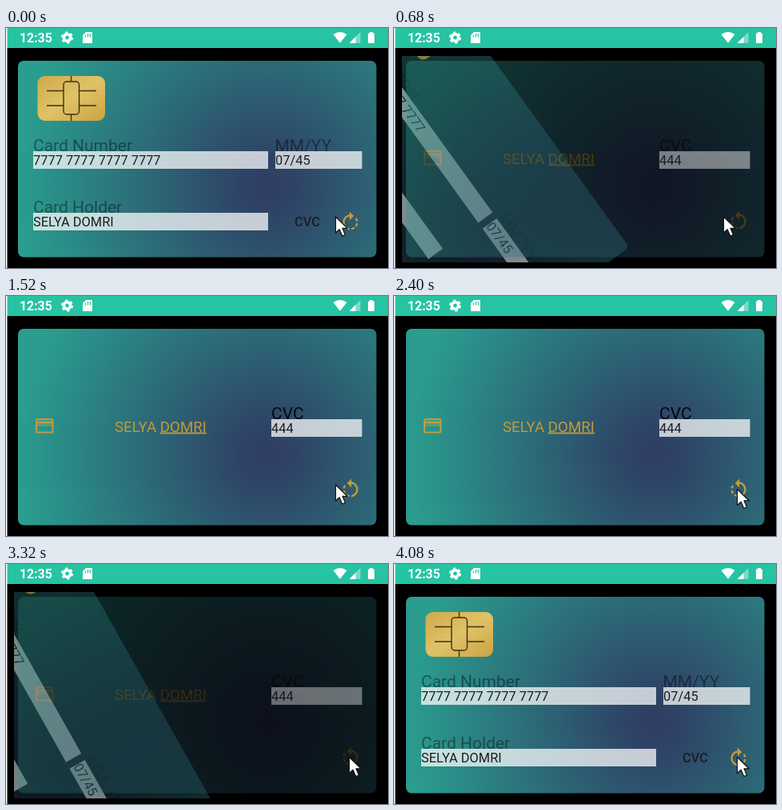
These frames come from a looping animation (478x300 px, 4120 ms). An HTML page:

```html
<!DOCTYPE html>
<html lang="en">
<head>
<meta charset="utf-8">
<title>Card flip</title>
<style>
  html, body { margin: 0; width: 100%; height: 100%; overflow: hidden; background: #000; }
  svg { display: block; width: 478px; height: 300px; font-family: Roboto, sans-serif; }
  .label { font-size: 21px; fill: #000; fill-opacity: .42; }
  .field { fill: #fff; fill-opacity: .73; }
  .value { font-size: 16.4px; fill: #1c1e22; }
  .gold { fill: #c39a3c; }
</style>
</head>
<body>
<svg viewBox="0 0 478 300">
  <defs>
    <radialGradient id="teal" gradientUnits="userSpaceOnUse" cx="327" cy="198" r="312">
      <stop offset="0" stop-color="#2f3d62"/>
      <stop offset=".12" stop-color="#2e4466"/>
      <stop offset="1" stop-color="#2a9d8f"/>
    </radialGradient>
    <linearGradient id="brass" x1="0" y1="0" x2="1" y2="1">
      <stop offset="0" stop-color="#d0a94a"/>
      <stop offset=".5" stop-color="#e0c266"/>
      <stop offset="1" stop-color="#c8a443"/>
    </linearGradient>
    <clipPath id="pane"><rect x="10" y="35" width="454" height="258"/></clipPath>
    <rect id="plate" x="15" y="41" width="448.500" height="245.500" rx="7" fill="url(#teal)"/>
    <path id="turn" class="gold" d="M15.550 5.550L11 1v3.070C7.060 4.560 4 7.920 4 12s3.050 7.440 7 7.930v-2.020c-2.840-.48-5-2.940-5-5.910s2.160-5.430 5-5.910V10zM19.930 11c-.17-1.390-.72-2.730-1.620-3.890l-1.420 1.420c.54.75.88 1.600 1.020 2.470zM13 17.900v2.020c1.390-.17 2.740-.71 3.900-1.610l-1.440-1.440c-.75.54-1.590.89-2.460 1.030zm3.890-2.420l1.420 1.410c.9-1.160 1.450-2.500 1.620-3.890h-2.020c-.14.87-.48 1.720-1.020 2.480z"/>
  </defs>

  <rect width="478" height="300"/>

  <g clip-path="url(#pane)">
    <g id="front">
      <use id="frontPlate" href="#plate"/>
      <g id="frontItems">
        <rect x="39.500" y="60" width="84.500" height="56" rx="9" fill="url(#brass)"/>
        <g fill="none" stroke="#3c3216" stroke-width="1.400">
          <rect x="72" y="67" width="19.500" height="41" rx="4"/>
          <path d="M51 78.500H72M51 97H72M91.500 78.500H113M91.500 97H113M81.500 60V67M81.500 108V116"/>
        </g>
        <text class="label" x="34" y="153.500">Card Number</text>
        <text class="label" x="336.500" y="153.500">MM/YY</text>
        <text class="label" x="34" y="231">Card Holder</text>
        <rect class="field" x="34" y="154" width="294" height="22"/>
        <rect class="field" x="337" y="154" width="108.500" height="22"/>
        <rect class="field" x="34" y="231" width="294" height="22"/>
        <text class="value" x="34" y="171">7777 7777 7777 7777</text>
        <text class="value" x="337" y="171">07/45</text>
        <text class="value" x="34" y="248">SELYA DOMRI</text>
        <text class="value" x="361" y="248" font-weight="500">CVC</text>
        <use href="#turn" transform="translate(416.600 228.400) scale(1.200)"/>
      </g>
    </g>

    <g id="backPlate">
      <use href="#plate"/>
      <g fill="none" stroke="#c39a3c" stroke-width="2">
        <rect x="38" y="154" width="20.500" height="16.500" rx="1.500"/>
        <path d="M38 158H58.500" stroke-width="3"/>
        <path d="M39 161.500H58" stroke-dasharray="1.500 1"/>
      </g>
      <text class="gold" x="136" y="169.500" font-size="18.700">SELYA <tspan text-decoration="underline">DOMRI</tspan></text>
      <use href="#turn" transform="translate(445.400 227.400) scale(-1.200 1.200)"/>
    </g>
    <g id="backItems">
      <text class="label" x="332" y="154" style="fill-opacity:.9">CVC</text>
      <rect class="field" x="332" y="154" width="113.500" height="22"/>
      <text class="value" x="332" y="171">444</text>
    </g>
  </g>

  <g fill="#fff">
    <rect width="478" height="25" fill="#26c4a3"/>
    <rect width="1.500" height="300"/>
    <text x="17" y="17.500" font-size="15.800" font-weight="700">12:35</text>
    <circle cx="76.500" cy="12" r="4.200" fill="none" stroke="#fff" stroke-width="3.600"/>
    <circle cx="76.500" cy="12" r="6.400" fill="none" stroke="#fff" stroke-width="2.200" stroke-dasharray="3.350"/>
    <path d="M100 5H107Q108 5 108 6V18Q108 19 107 19H97Q96 19 96 18V9Z"/>
    <path d="M99.500 8.500V11.500M102.500 7V11.500M105.300 7V11.500" stroke="#26c4a3" stroke-width="1.200"/>
    <path d="M409.500 8Q418 2 426.500 8L418 18.800Z"/>
    <path d="M443.500 5V18.800H429.700Z" fill-opacity=".4"/>
    <path d="M437.500 11V18.800H429.700Z"/>
    <path d="M455 6.500V5H459V6.500H460Q461 6.500 461 7.500V18Q461 19 460 19H454Q453 19 453 18V7.500Q453 6.500 454 6.500Z"/>
  </g>

  <path id="cursor" d="M0 0V20L4.700 15.700L8.300 24L12 22.400L8.500 14.300H14.700Z" fill="#fff" stroke="#111" stroke-width="1.200" stroke-linejoin="round"/>
</svg>
<script>
  const LOOP = 4120;
  const SPIN = 150;        // degrees turned when the front has left
  const SLIDE = 3.25;      // pixels moved left per degree
  const OUT = 306, IN = 2701, TURN = 1040;
  const FADE_IN = 1000, FADE_OUT = 900;
  const MOVE = { at: 2080, span: 200, from: [412.5, 236], to: [429.5, 241.5] };

  const el = id => document.getElementById(id);
  const ramp = (t, at, span) => Math.min(1, Math.max(0, (t - at) / span));
  const mix = (a, b, k) => a + (b - a) * k;

  // The plate fades faster than what lies on it.
  function fade(side, alpha) {
    el(side + 'Plate').setAttribute('opacity', alpha * alpha);
    el(side + 'Items').setAttribute('opacity', alpha);
  }

  function draw(t) {
    const gone = ramp(t, OUT, TURN) - ramp(t, IN, TURN);
    const angle = gone * SPIN;
    el('front').setAttribute('transform',
      `translate(${-angle * SLIDE} 0) rotate(${angle} 238.5 164)`);
    fade('front', 1 - gone);

    const hidden = 1 - ramp(t, OUT, FADE_IN) + ramp(t, IN, FADE_OUT);
    fade('back', 1 - hidden * hidden);

    const k = ramp(t, MOVE.at, MOVE.span);
    const [x, y] = MOVE.from.map((v, i) => mix(v, MOVE.to[i], k));
    el('cursor').setAttribute('transform', `translate(${x} ${y})`);
  }

  const start = performance.now();
  function tick() {
    draw((performance.now() - start) % LOOP);
    requestAnimationFrame(tick);
  }
  tick();
</script>
</body>
</html>
```
